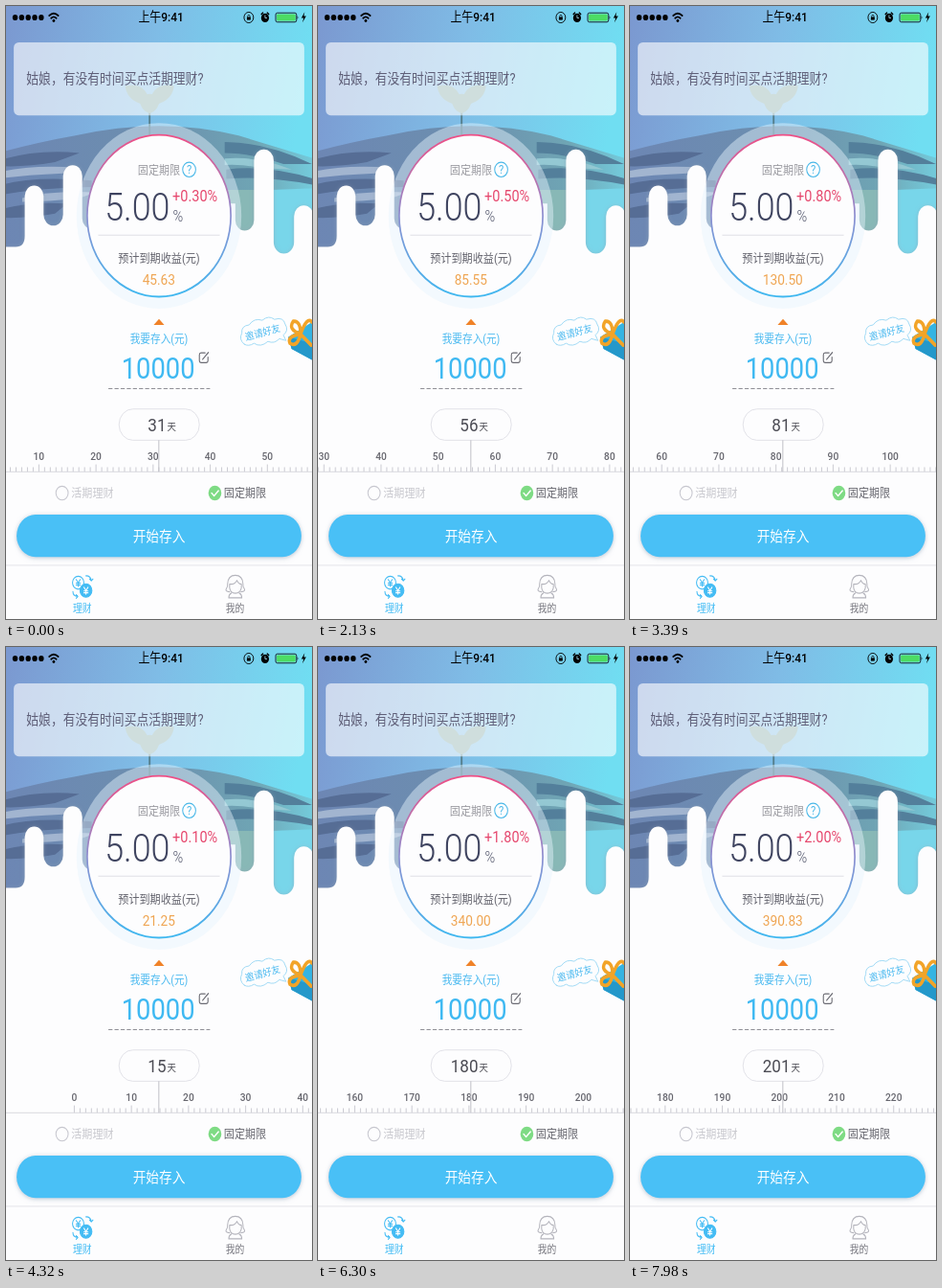
Write an HTML page that moves like this. It is 320 px wide and 640 px high and loops after 8 s.

```html
<!DOCTYPE html>
<html lang="zh-CN">
<head>
<meta charset="utf-8">
<title>理财</title>
<style>
  html, body { margin: 0; width: 100%; height: 100%; overflow: hidden; background: #fdfdfe; }
  svg { display: block; width: 100vw; height: 100vh; }
  text { font-family: Roboto, "Noto Sans CJK SC", "Noto Sans CJK", sans-serif; font-size: 13px; }
  .mid { text-anchor: middle; }
  .end { text-anchor: end; }
  .light { font-weight: 300; }
  .line { fill: none; stroke-linecap: round; stroke-linejoin: round; }
</style>
</head>
<body>
<!-- A 375 x 667 phone screen, fitted to the stage -->
<svg viewBox="0 0 375 667" preserveAspectRatio="none">
  <defs>
    <linearGradient id="sky" x1="0" y1="0" x2="1" y2=".15">
      <stop offset="0" stop-color="#7b98d0"/>
      <stop offset=".5" stop-color="#7fbce6"/>
      <stop offset="1" stop-color="#70def2"/>
    </linearGradient>
    <linearGradient id="ground">
      <stop offset="0" stop-color="#6d86b4"/>
      <stop offset=".5" stop-color="#6c8fae"/>
      <stop offset=".8" stop-color="#6fa5b4"/>
      <stop offset="1" stop-color="#74cfe0"/>
    </linearGradient>
    <linearGradient id="ring" x1="0" y1="0" x2="0" y2="1">
      <stop offset="0" stop-color="#ee4f86"/>
      <stop offset=".5" stop-color="#8d8fd0"/>
      <stop offset="1" stop-color="#3fb8f0"/>
    </linearGradient>
    <filter id="glow" x="-20%" y="-30%" width="140%" height="160%">
      <feDropShadow dx="0" dy="1" stdDeviation="2.5" flood-color="#8fa0b4" flood-opacity=".6"/>
    </filter>
    <filter id="soft"><feGaussianBlur stdDeviation=".8"/></filter>
  </defs>

  <!-- Header picture -->
  <rect width="375" height="285" fill="url(#sky)"/>
  <g filter="url(#soft)">
    <path d="M-10 160Q40 148 85 141Q190 120 285 141L385 168V290H-10Z" fill="url(#ground)"/>
    <g fill="#566d95">
      <path d="M-10 168Q40 155 90 160L60 170Q20 176 -10 174Z"/>
      <path d="M-10 196Q30 184 105 190V197Q40 198 -10 206Z"/>
      <path d="M-10 222Q30 212 75 215L60 226Q20 232 -10 230Z"/>
    </g>
    <g fill="#a2b5d0">
      <path d="M-10 181Q30 172 92 176L70 182Q20 184 -10 188Z"/>
      <path d="M20 209Q60 200 110 203L90 209Q50 213 20 213Z"/>
    </g>
    <g fill="#537f9b">
      <path d="M268 148Q320 148 375 172L340 172Q300 160 268 160Z"/>
      <path d="M270 178Q320 172 385 190V196Q320 184 270 188Z"/>
    </g>
    <path d="M268 166Q310 163 350 178L310 176Q290 172 268 173Z" fill="#94c8d3"/>
    <path d="M325 200L385 198V290H325Z" fill="#78d6ea"/>
    <path d="M268 200H310V260H268Z" fill="#88b8b6"/>
  </g>
  <path d="M176 108V140" stroke="#557f8d" stroke-width="2.2"/>
  <g fill="#80aaa6">
    <path d="M176 108Q149 106 146 87Q174 82 176 108Z"/>
    <path d="M176 108Q203 106 206 87Q178 82 176 108Z"/>
    <path d="M162 99Q176 92 190 99Q187 114 176 117Q165 114 162 99Z"/>
  </g>

  <!-- Dripping edge -->
  <path filter="url(#glow)" fill="#fdfdfe" d="M-20 262H12Q23 262 23 250V207a11.5 11.5 0 0 1 23 0V227a12 12 0 0 0 24 0V185a11.7 11.7 0 0 1 23.4 0V231a11.7 11.7 0 0 0 23.4 0V215H281V233a11.5 11.5 0 0 0 23 0V168a12 12 0 0 1 24 0V257a12.5 12.5 0 0 0 25 0V229a12 12 0 0 1 24 0H400V700H-20Z"/>

  <!-- Message card -->
  <rect x="9.5" y="39.5" width="356" height="79.5" rx="6" fill="#fff" fill-opacity=".62"/>
  <text x="25" y="84.5" style="font-size:15px" fill="#5f5f78">姑娘，有没有时间买点活期理财?</text>

  <!-- Status bar -->
  <g>
    <g id="signal"></g>
    <path class="line" stroke="#000" stroke-width="2" d="M53 10.5Q58.5 5.5 64 10.5M55.3 13.2Q58.5 10.5 61.7 13.2"/>
    <circle cx="58.5" cy="16" r="1.6"/>
    <text class="mid" x="190" y="17" style="font-size:14px;font-weight:500">上午9:41</text>
    <circle cx="297.5" cy="12.5" r="5.8" fill="none" stroke="#000"/>
    <path d="M295.2 12h4.6v3.2h-4.6z"/>
    <path class="line" d="M296.2 12v-1a1.3 1.3 0 0 1 2.6 0V12" stroke="#000" stroke-width=".8"/>
    <circle cx="317.5" cy="13" r="4.8"/>
    <path class="line" d="M313 9l1.8-1.6M322 9l-1.8-1.6" stroke="#000" stroke-width="1.5"/>
    <path class="line" d="M317.5 10.3V13h2" stroke="#9cd"/>
    <rect x="330.5" y="7.5" width="25.5" height="10" rx="2" fill="none" stroke="#000" stroke-width=".9"/>
    <rect x="331.8" y="8.8" width="23" height="7.4" rx="1" fill="#4cdc64"/>
    <path d="M357 10.5q2 2 0 4zM366 6.5l-4 6.5h2.7l-1.4 5 4.5-7h-2.8z"/>
  </g>

  <!-- Rate dial -->
  <circle cx="187.5" cy="228.3" r="101" fill="#e6f3fc" fill-opacity=".45"/>
  <circle cx="187.5" cy="228.3" r="88" fill="#fdfdfe" stroke="url(#ring)" stroke-width="2"/>
  <text class="mid" x="187.5" y="183" fill="#9a9aa0">固定期限</text>
  <circle cx="224.5" cy="178" r="8" fill="none" stroke="#4ab8e8" stroke-width="1.2"/>
  <text class="mid" x="224.5" y="182.7" fill="#4ab8e8">?</text>
  <text class="light" x="121" y="233.5" style="font-size:42px" fill="#3f4460">5.00</text>
  <text id="bonus" x="204" y="212.8" style="font-size:17px" fill="#e6486e"></text>
  <text class="light" x="204.5" y="234" style="font-size:17px" fill="#50546a">%</text>
  <path d="M113 249.3H262" stroke="#dcdce4"/>
  <text class="mid" x="187.5" y="279" fill="#62626c">预计到期收益(元)</text>
  <text class="mid" id="profit" x="187.3" y="303" style="font-size:16px" fill="#efa552"></text>

  <!-- Amount -->
  <path d="M187.5 340.5L194 347H181Z" fill="#f08228"/>
  <text class="mid" x="187.5" y="367" style="font-size:12.5px" fill="#4cbaf0">我要存入(元)</text>
  <text class="mid" x="186.5" y="405" style="font-size:32px" fill="#3fb9f2">10000</text>
  <path class="line" stroke="#6c6c74" stroke-width="1.3" d="M244 377.5H239Q237 377.5 237 379.5V386Q237 388 239 388H245.5Q247.5 388 247.5 386V382M241 384.5L248 377"/>
  <path d="M125.5 416.4H250" stroke="#8f8f96" stroke-width="1.2" stroke-dasharray="5 2.5"/>

  <!-- Invitation -->
  <path class="line" stroke="#9ad8f4" style="fill:#fdfdfe" d="M292 368Q285 363 289 356Q288 348 298 347Q304 339 314 342Q322 336 329 341Q340 338 342 346Q347 353 340 358L343 364L335 362Q329 368 321 365Q312 372 304 367Q297 371 292 368Z"/>
  <text class="mid" transform="translate(315.5 359) rotate(-14)" style="font-size:11px" fill="#4cbaf0">邀请好友</text>
  <path d="M346 360L375 344V385L350 373Z" fill="#35b4e2"/>
  <path d="M346 360L375 367V385L350 373Z" fill="#2498ca"/>
  <path class="line" stroke="#f2a428" stroke-width="4" d="M361 357Q345 352 352 343Q361 342 361 357Q369 337 375 344M361 357Q344 359 348 367Q357 372 361 357L374 369"/>

  <!-- Term ruler -->
  <g id="ruler">
    <path id="ticks" stroke="#c6c6ce" fill="none"/>
  </g>
  <path d="M0 506.8H375" stroke="#d6d6dc"/>
  <rect x="138.5" y="438.5" width="98.5" height="34" rx="17" fill="#fdfdfe" stroke="#dfdfe6"/>
  <path d="M187.3 472.5V506.8" stroke="#c0c0c8" stroke-width="1.2"/>
  <text class="end" id="days" x="196.3" y="462.3" style="font-size:20px" fill="#4c4c54"></text>
  <text x="197.5" y="461.5" style="font-size:11px" fill="#4c4c54">天</text>

  <!-- Product choice -->
  <circle cx="68.7" cy="530" r="7.5" fill="none" stroke="#c6c6ce" stroke-width="1.2"/>
  <text x="80" y="535" fill="#c8c8ce">活期理财</text>
  <circle cx="256" cy="530" r="8" fill="#7edb84"/>
  <path class="line" d="M252 530l3 3 5.3-5.5" stroke="#fff" stroke-width="1.6"/>
  <text x="267" y="535" fill="#66666e">固定期限</text>

  <rect filter="url(#glow)" x="13" y="553.5" width="349" height="46" rx="23" fill="#48c0f6"/>
  <text class="mid" x="187.5" y="583" style="font-size:16px" fill="#fff">开始存入</text>

  <!-- Tab bar -->
  <path d="M0 608.6H375" stroke="#e2e2e8"/>
  <g class="line" stroke="#44bcf4" stroke-width="1.2">
    <circle cx="88.5" cy="627.5" r="7"/>
    <circle cx="98" cy="636" r="7.3" fill="#44bcf4"/>
    <path d="M98 620q6 0 6.5 5.5l-2-2m2 2l2-2M82 637q0 5 6 5.5l-2-2m2 2l-2 2"/>
    <path d="M86 624l2.5 3.5 2.5-3.5M88.5 627.5v4M86 628h5M86 630h5"/>
    <path d="M95.5 632.5l2.5 3.5 2.5-3.5M98 636v4M95.5 636.5h5M95.5 638.5h5" stroke="#fff"/>
  </g>
  <text class="mid" x="93.5" y="659.5" style="font-size:11.5px" fill="#44bcf4">理财</text>
  <path class="line" stroke="#b4b4bc" stroke-width="1.2" d="M274 637.5Q268 637 270 634Q272 632 271.5 629Q272 619.5 281 619.5Q290 619.5 290.5 629Q290 632 292 634Q294 637 288 637.5M274 629Q280 630 283 625Q285 629 288.5 629V633Q287 639 281 639Q275 639 274 633ZM276 639Q273 640 273 644H289Q289 640 286 639"/>
  <text class="mid" x="280.7" y="659.5" style="font-size:11.5px" fill="#77777f">我的</text>
</svg>
<script>
  const LOOP = 8000, UNIT = 7, CENTER = 187.3, MAX_DAYS = 260;
  const $ = id => document.getElementById(id);
  const add = (parent, tag, attrs, text = '') => {
    const node = document.createElementNS(parent.namespaceURI, tag);
    for (const key in attrs) node.setAttribute(key, attrs[key]);
    node.textContent = text;
    parent.append(node);
  };

  for (let i = 0; i < 5; i++) add($('signal'), 'circle', { cx: 11.2 + i * 8, cy: 12.5, r: 3.2 });

  let ticks = '';
  for (let day = 0; day <= MAX_DAYS; day++) {
    const major = day % 10 === 0;
    ticks += `M${day * UNIT} 506.8v${major ? -8 : -5}`;
    if (major) add($('ruler'), 'text', {
      class: 'mid', x: day * UNIT, y: 494, fill: '#66666e', style: 'font-size:12px;font-weight:500'
    }, day);
  }
  $('ticks').setAttribute('d', ticks);

  // Ruler position over time: [ms, days], joined by a monotone cubic
  const stops = [[0, 31], [2130, 55.7], [3390, 81.2], [4320, 14.8], [5610, 91.4], [6300, 180.3], [LOOP, 200.6]];
  const rate = i => (stops[i + 1][1] - stops[i][1]) / (stops[i + 1][0] - stops[i][0]);
  const slopes = stops.map((_, i) => {
    if (i === 0 || i === stops.length - 1) return 0;
    const a = rate(i - 1), b = rate(i);
    return a * b > 0 ? 2 * a * b / (a + b) : 0;
  });

  function daysAt(time) {
    let i = 0;
    while (time >= stops[i + 1][0]) i++;
    const [t0, d0] = stops[i], [t1, d1] = stops[i + 1];
    const span = t1 - t0, u = (time - t0) / span, v = 1 - u;
    return d0 * v * v * (1 + 2 * u) + d1 * u * u * (3 - 2 * u)
      + span * u * v * (slopes[i] * v - slopes[i + 1] * u);
  }

  function draw(now) {
    const position = daysAt(now % LOOP), days = Math.round(position);
    const bonus = Math.floor(days / 10) * 10;
    const cents = Math.floor(days * (500 + bonus) * 100 / 360);
    $('ruler').setAttribute('transform', `translate(${CENTER - position * UNIT} 0)`);
    $('days').textContent = days;
    $('bonus').textContent = `+${(bonus / 100).toFixed(2)}%`;
    $('profit').textContent = (cents / 100).toFixed(2);
    requestAnimationFrame(() => draw(performance.now() - start));
  }
  const start = performance.now();
  draw(0);
</script>
</body>
</html>
```
